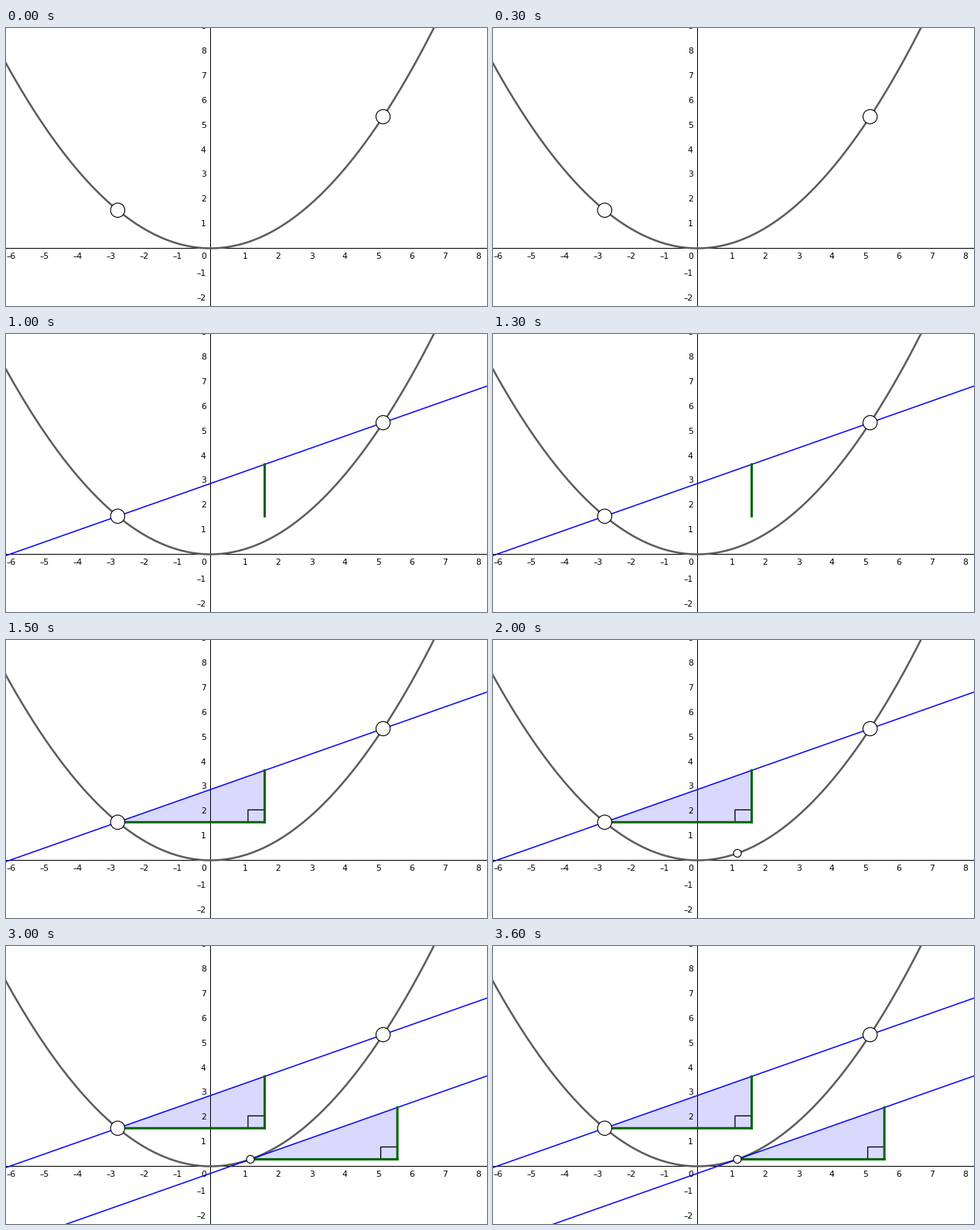
Write a matplotlib script that moves like this. It is 622 px wide and 359 px high and loops after 4 s.

```python
import numpy as np
import matplotlib.pyplot as plt
from matplotlib.animation import FuncAnimation
from matplotlib.patches import Circle, Polygon

W, H, DPI = 622, 359, 100
PT = 72 / DPI                      # points per pixel
OX, OY = 264.5, 284.5              # origin in pixels
UX, UY = 43.13, 31.86              # pixels per unit
BLUE, GREEN, GRAY = "#0000ff", "#006400", "#5c5c5c"
CURVATURE = 0.1993
LEFT, RIGHT = -2.784, 5.174        # ends of the secant
MIDDLE = (LEFT + RIGHT) / 2        # where the tangent is parallel to it
SLOPE = CURVATURE * (LEFT + RIGHT)
RUN, CORNER = 4.407, 0.5
STEP_MS, STEPS = 500, 8

plt.rcParams["path.snap"] = False
fig = plt.figure(figsize=(W / DPI, H / DPI), dpi=DPI, facecolor="white")
ax = fig.add_axes([0, 0, 1, 1])
ax.set(xlim=(0, W), ylim=(H, 0))
ax.axis("off")


def parabola(x):
    return CURVATURE * x * x


def px(x):
    return OX + UX * np.asarray(x, float)


def py(y):
    return OY - UY * np.asarray(y, float)


def stroke(xs, ys, color, width, z, cap="butt"):
    return ax.plot(px(xs), py(ys), color=color, lw=width * PT, zorder=z,
                   solid_capstyle=cap, solid_joinstyle="miter")[0]


def label(x, y, value, align):
    text = str(value).replace("-", "\N{EN DASH}")
    ax.text(x, y + 3.5, text, ha=align, va="baseline", zorder=2,
            family="DejaVu Sans", size=10.8 * PT, color="black")


def draw_axes():
    ax.plot([0, W], [OY, OY], color="black", lw=PT, zorder=2)
    ax.plot([OX, OX], [0, H], color="black", lw=PT, zorder=2)
    for n in range(-6, 9):
        if n:
            label(px(n) + (1.3 if n > 0 else 0.5), 295, n, "center")
    for n in range(-2, 10):
        if n:
            label(258.7, py(n), n, "right")
    label(258.7, 295, 0, "right")


def point(x, radius):
    dot = Circle((px(x), py(parabola(x))), radius, fc="white", ec="black",
                 lw=1.1 * PT, zorder=8)
    return ax.add_patch(dot)


def sloped_line(x):
    xs = np.array([-7, 9])
    return stroke(xs, parabola(x) + SLOPE * (xs - x), BLUE, 1.5, 4)


def slope_triangle(x):
    """Return the rise, and the remaining parts of the triangle."""
    y = parabola(x)
    end, top = x + RUN, y + SLOPE * RUN
    rise = stroke([end, end], [y, top], GREEN, 3, 6, "projecting")
    run = stroke([x, end], [y, y], GREEN, 3, 6, "projecting")
    mark = stroke([end - CORNER, end - CORNER, end],
                  [y, y + CORNER, y + CORNER], "black", 1.3, 5)
    fill = Polygon(np.column_stack([px([x, end, end]), py([y, y, top])]),
                   fc=BLUE, alpha=0.15, lw=0, zorder=1)
    return rise, [run, mark, ax.add_patch(fill)]


draw_axes()
curve_x = np.linspace(-7, 7, 400)
stroke(curve_x, parabola(curve_x), GRAY, 2.5, 3)
point(LEFT, 9.2)
point(RIGHT, 9.2)

rise, rest = slope_triangle(LEFT)
rise_2, rest_2 = slope_triangle(MIDDLE)
stages = [
    [sloped_line(LEFT)],
    [rise],
    rest,
    [point(MIDDLE, 5)],
    [sloped_line(MIDDLE)],
    [rise_2, *rest_2],
]


def update(step):
    for start, parts in enumerate(stages, 1):
        for part in parts:
            part.set_visible(step >= start)
    return [part for parts in stages for part in parts]


anim = FuncAnimation(fig, update, frames=STEPS, interval=STEP_MS,
                     init_func=lambda: update(0), repeat=True, repeat_delay=0)
plt.show()
```
